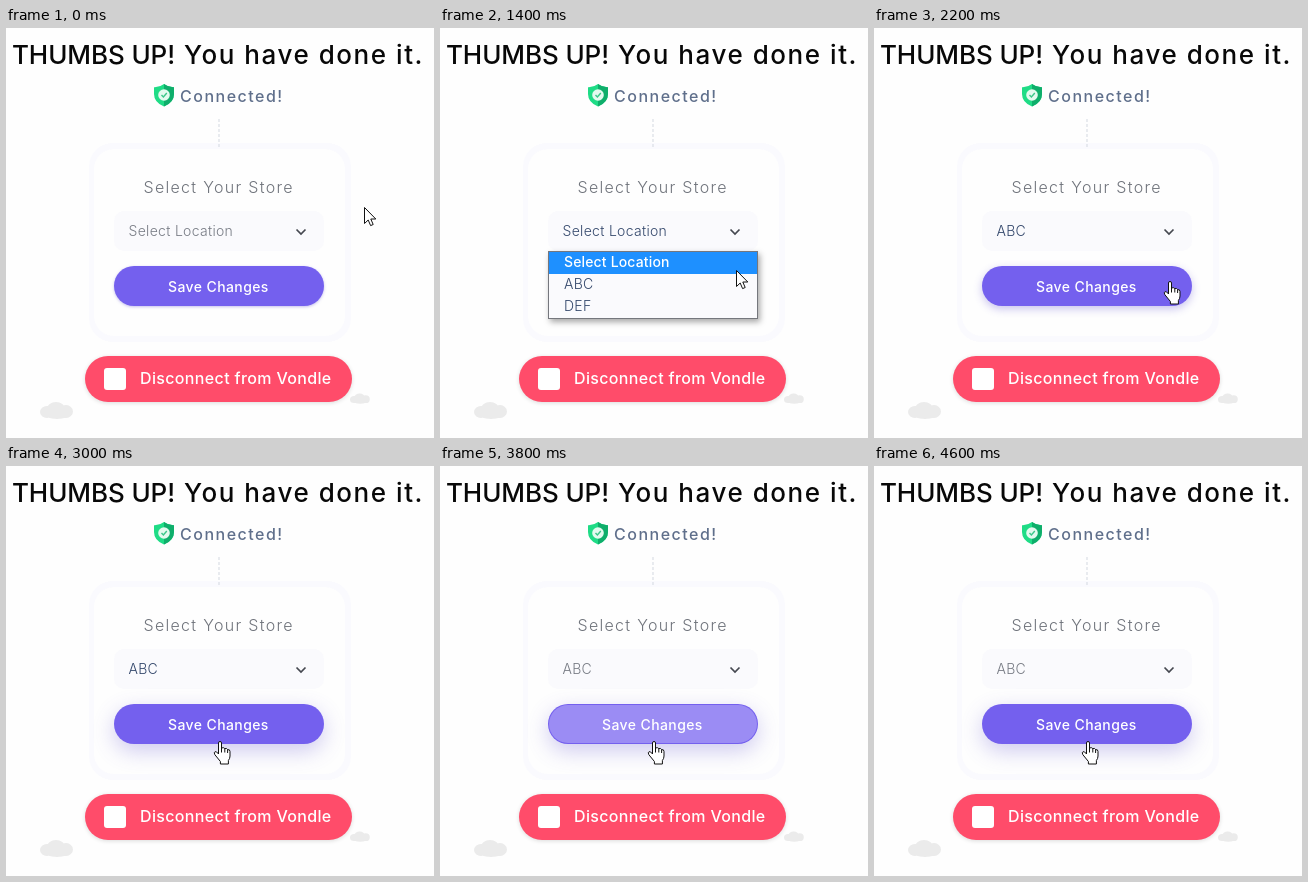
Animation, 428 px wide and 410 px high, one loop 5.2 s. Source, as an HTML page with a canvas:

```html
<!DOCTYPE html>
<html lang="en">
<head>
<meta charset="utf-8">
<title>Store connection</title>
<style>
html, body { margin: 0; width: 100%; height: 100%; overflow: hidden; background: #fefefe; }
canvas { display: block; }
</style>
</head>
<body>
<canvas id="stage" width="428" height="410"></canvas>
<script>
const ctx = document.getElementById('stage').getContext('2d');
const LOOP = 5200, STEP = 200;
const PAPER = '#fefefe', PALE = '#fafafd', VIOLET = '#7460ee';
const OPTIONS = ['Select Location', 'ABC', 'DEF'];

// Pointer keys: time, hot spot x, hot spot y, shape
const POINTER = [
  [0, 358, 179, 'arrow'], [200, 322, 185, 'arrow'], [400, 303, 203, 'hand'],
  [1000, 303, 203, 'hand'], [1200, 298, 226, 'arrow'], [1400, 296, 242, 'arrow'],
  [1600, 296, 250, 'arrow'], [1800, 296, 252, 'arrow'], [2000, 296, 252, 'arrow'],
  [2200, 296, 253, 'hand'], [2400, 263, 263, 'hand'], [2600, 229, 272, 'hand'],
  [2800, 214, 275, 'hand'], [LOOP, 214, 275, 'hand']
];

const ARROW = new Path2D('M.5.5V16.5L4.2 13L6.6 18.6L9.2 17.5L6.8 12H11.8Z');
const HAND = new Path2D('M-1.5 2Q-1.5.5 0 .5Q1.5.5 1.5 2V7Q3.6 6 4.8 7.6Q6.8 6.8 7.6 8.6' +
  'Q10 8.2 10 10.5V15Q10 17.5 8.4 19.5V23H.4V20.5L-5.2 13.6Q-6.4 11.4-5 10.7Q-3.6 10-1.5 13Z');
const KNUCKLES = new Path2D('M1.5 7V11.5M4.8 7.6V11.5M7.6 8.6V12');
const SHIELD = new Path2D('M158 56Q162.5 59.5 168 59.2V66Q168 74.5 158 78.5Q148 74.5 148 66V59.2Q153.5 59.5 158 56Z');

function shadow(color, blur, dy, dx = 0) {
  ctx.shadowColor = color;
  ctx.shadowBlur = blur;
  ctx.shadowOffsetX = dx;
  ctx.shadowOffsetY = dy;
}

function noShadow() { shadow('transparent', 0, 0); }

function box(x, y, w, h, r, fill) {
  ctx.beginPath();
  ctx.roundRect(x, y, w, h, r);
  ctx.fillStyle = fill;
  ctx.fill();
}

function label(str, x, y, size, weight, color, spacing) {
  ctx.font = `${weight} ${size}px Inter, "Open Sans", sans-serif`;
  ctx.letterSpacing = spacing + 'px';
  ctx.fillStyle = color;
  ctx.fillText(str, x, y);
}

function line(points, color, width) {
  ctx.beginPath();
  points.forEach(([x, y]) => ctx.lineTo(x, y));
  ctx.strokeStyle = color;
  ctx.lineWidth = width;
  ctx.stroke();
}

function cloud(x, y, s) {
  ctx.save();
  ctx.translate(x, y);
  ctx.scale(s, s);
  ctx.fillStyle = '#ebebeb';
  ctx.beginPath();
  for (const [cx, cy, rx, ry] of [[7, 10, 7, 6], [16, 7, 9, 7], [17, 12, 13, 5], [26, 9.5, 7, 6.5]]) {
    ctx.moveTo(cx + rx, cy);
    ctx.ellipse(cx, cy, rx, ry, 0, 0, 7);
  }
  ctx.fill();
  ctx.restore();
}

function drawShield() {
  ctx.fillStyle = '#1fdc86';
  ctx.fill(SHIELD);
  ctx.save();
  ctx.clip(SHIELD);
  ctx.fillStyle = '#0fae6b';
  ctx.fillRect(158, 55, 11, 25);
  ctx.restore();
  ctx.beginPath();
  ctx.arc(158, 67, 5.8, 0, 7);
  ctx.fillStyle = '#e3faef';
  ctx.fill();
  line([[155.5, 67], [157.4, 69], [160.8, 65]], '#3cc78a', 1.4);
}

function drawPage() {
  ctx.fillStyle = PAPER;
  ctx.fillRect(0, 0, 428, 410);
  cloud(34, 374, 1);
  cloud(344, 365.5, 0.6);

  label('THUMBS UP!', 6, 36, 26, 500, '#080808', -0.1);
  label('You have done it.', 178, 36, 26, 500, '#080808', 1.55);
  drawShield();
  label('Connected!', 174, 74, 16, 500, '#5f6f8b', 1.5);

  box(83, 115, 262, 199, 24, '#fafafe');
  box(88, 121, 251, 187, 20, PAPER);
  ctx.setLineDash([3, 2]);
  line([[213, 91], [213, 119]], '#d3d8e0', 1);
  ctx.setLineDash([]);
  label('Select Your Store', 137.5, 165, 16, 300, '#6f737b', 1.3);

  shadow('rgba(0,0,0,.14)', 4, 1);
  box(79, 328, 267, 46, 23, '#ff4c6a');
  noShadow();
  box(98, 340, 22, 22, 3, '#fff');
  label('Disconnect from Vondle', 134, 356, 16, 500, '#fff', 0.35);
}

function drawSelect(value, focused) {
  box(108, 183, 210, 40, 10, PALE);
  label(value, 122.5, 208, 14, 300, focused ? '#33476b' : '#777b84', 0.3);
  line([[290.5, 201.5], [295, 206], [299.5, 201.5]], '#454850', 1.7);
}

function drawButton(lift, pressed) {
  shadow(`rgba(90,75,205,${0.35 - 0.06 * lift})`, 3 + 18 * lift, 1 + 6 * lift);
  box(108, 238, 210, 40, 20, VIOLET);
  noShadow();
  if (pressed) box(109, 239, 208, 38, 19, '#9b8cf4');
  label('Save Changes', 162, 264, 14, 500, '#fff', 0.4);
}

function drawMenu(active) {
  shadow('rgba(0,0,0,.35)', 6, 3, 2);
  box(108, 223, 210, 68, 0, '#75777d');
  noShadow();
  box(109, 224, 208, 66, 0, PALE);
  OPTIONS.forEach((name, i) => {
    const on = i === active, y = 224 + 22 * i;
    if (on) box(109, y, 208, 22, 0, '#1e90ff');
    label(name, 124, y + 15, 14, on ? 500 : 300, on ? '#fff' : '#33476b', on ? 0.15 : 0.3);
  });
}

function drawPointer(t) {
  const i = POINTER.findLastIndex(k => k[0] <= t);
  const a = POINTER[i], b = POINTER[i + 1];
  const u = (t - a[0]) / (b[0] - a[0]);
  ctx.save();
  ctx.translate(a[1] + (b[1] - a[1]) * u, a[2] + (b[2] - a[2]) * u);
  const shape = a[3] === 'hand' ? HAND : ARROW;
  ctx.fillStyle = '#fff';
  ctx.strokeStyle = '#111';
  ctx.lineWidth = 1;
  ctx.fill(shape);
  ctx.stroke(shape);
  if (shape === HAND) ctx.stroke(KNUCKLES);
  ctx.restore();
}

function draw(now) {
  const t = Math.floor(now % LOOP / STEP) * STEP;
  const lift = Math.max(0, Math.min(1, (t - 2000) / 600));
  drawPage();
  drawSelect(t < 2200 ? OPTIONS[0] : OPTIONS[1], t >= 600 && t < 3800);
  if (t >= 600 && t < 2200) drawMenu(t < 1600 ? 0 : 1);
  else drawButton(lift, t === 3800);
  drawPointer(t);
}

const start = performance.now();
function tick() {
  draw(performance.now() - start);
  requestAnimationFrame(tick);
}
tick();
</script>
</body>
</html>
```
